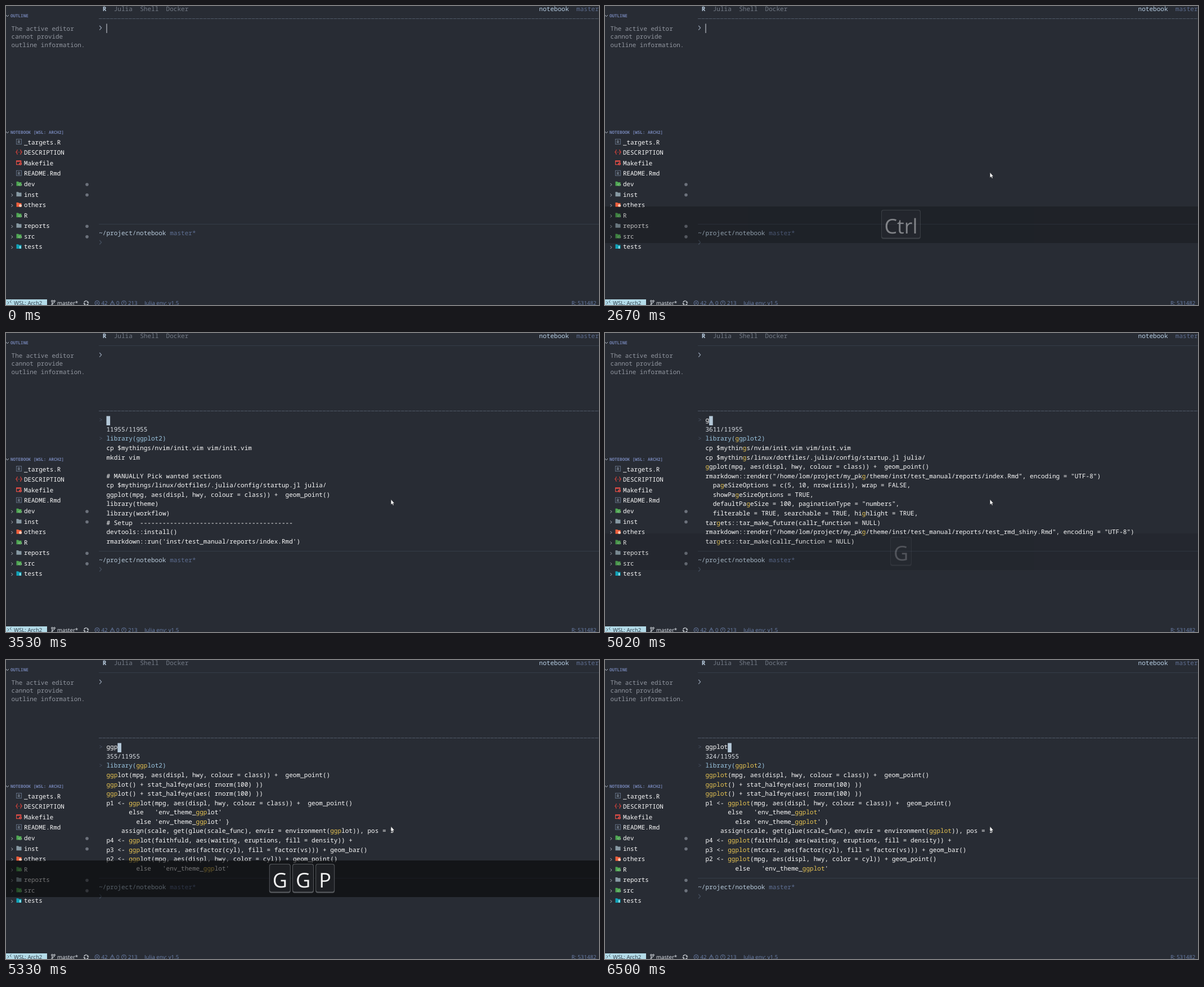
Animation of 1054x531 px, one loop 8 s. Source, as an HTML page:

```html
<!DOCTYPE html>
<html lang="en">
<head>
<meta charset="utf-8">
<title>Terminal history search</title>
<style>
  html, body { margin: 0; width: 100%; height: 100%; overflow: hidden; background: #282c34; }
  svg { display: block; width: 1054px; height: 531px; }
  text { white-space: pre; text-rendering: geometricPrecision; }
  .mono, .side, .head { font-family: "Noto Sans Mono", "DejaVu Sans Mono", monospace; }
  .mono { font-size: 11.05px; font-weight: 500; }
  .side { font-size: 10.9px; font-weight: 500; }
  .head { font-size: 7.55px; font-weight: 700; }
  .bar { font-family: "Open Sans", "Noto Sans", sans-serif; font-size: 9.7px; }
  .key { font-family: "Open Sans", "Noto Sans", sans-serif; font-size: 36px; text-anchor: middle; }
</style>
</head>
<body>
<svg id="stage" viewBox="0 0 1054 531" xml:space="preserve">
  <rect width="1054" height="531" fill="#282c34"/>
  <g id="side"></g>
  <g id="term"></g>
  <g id="idle"></g>
  <g id="search"></g>
  <g id="status"></g>
  <g id="keys"></g>
  <path id="mouse" d="M0 0V9.4L2.2 7.5L3.7 10.6L5.1 9.9L3.7 6.9H6.3Z" fill="#fff" stroke="#15171b" stroke-width=".5"/>
</svg>
<script>
const LOOP = 8000;
const LEFT = 165.2, COL = 6.63, ROW = 16.56;
const $ = id => document.getElementById(id);
const colX = c => LEFT + c * COL;
const rowY = r => 5.7 + r * ROW;

function add(parent, tag, attrs, content) {
  const node = document.createElementNS("http://www.w3.org/2000/svg", tag);
  for (const k in attrs) node.setAttribute(k, attrs[k]);
  if (content !== undefined) node.textContent = content;
  parent.appendChild(node);
  return node;
}
const label = (g, cls, x, y, fill, s, more) =>
  add(g, "text", { class: cls, x, y, fill, ...more }, s);
const cell = (g, col, row, fill, s, more) =>
  label(g, "mono", colX(col), Math.round(rowY(row) + 3.6), fill, s, more);
const stroke = (g, d, color, width = 1) =>
  add(g, "path", { d, fill: "none", stroke: color, "stroke-width": width });
const box = (g, x, y, width, height, fill, rx = 0) =>
  add(g, "rect", { x, y, width, height, fill, rx });
const dot = (g, cx, cy, r, fill) => add(g, "circle", { cx, cy, r, fill });

function rule(g, y, bright) {
  const line = stroke(g, `M165 ${y}H1054`, bright ? "#505968" : "#353c48");
  if (bright) line.setAttribute("stroke-dasharray", "5.63 1");
}
function prompt(g, row, color) {
  const y = rowY(row);
  stroke(g, `M${LEFT + 1} ${y - 3.8}L${LEFT + 4.4} ${y}L${LEFT + 1} ${y + 3.8}`, color, 1.3);
}

// Sidebar
function folder(g, y, color) {
  add(g, "path", { d: `M18.5 ${y - 4.5}h3.4l1.2 1.2h4.4v6.6h-9z`, fill: color });
}
const icons = {
  r(g, y) {
    add(g, "rect", { x: 18.5, y: y - 5.5, width: 9, height: 9, fill: "none", stroke: "#66748a", "stroke-width": .9 });
    label(g, "head", 20.7, y + 1.9, "#a5b4c6", "R", { style: "font-weight:400" });
  },
  braces(g, y) {
    stroke(g, `M20.8 ${y - 5}q-1.4 0-1.4 1.6t-1.3 2.2q1.3.5 1.3 2.2t1.4 1.6M25.2 ${y - 5}q1.4 0 1.4 1.6t1.3 2.2q-1.3.5-1.3 2.2t-1.4 1.6`, "#e5453d", 1.1);
    dot(g, 22, y - 1, .6, "#e5453d");
    dot(g, 24, y - 1, .6, "#e5453d");
  },
  make(g, y) {
    add(g, "rect", { x: 18.6, y: y - 4, width: 8, height: 6.5, fill: "none", stroke: "#ee5048", "stroke-width": 1.1 });
    box(g, 18, y - 4.6, 9.2, 2, "#ee5048");
    dot(g, 25.6, y + 1.2, 2.4, "#ee5048");
    dot(g, 25.6, y + 1.2, .8, "#282c34");
  },
  code(g, y) {
    folder(g, y, "#4fa653");
    stroke(g, `M24.2 ${y - .6}l-1.5 1.8l1.5 1.8M26.4 ${y - .6}l1.5 1.8l-1.5 1.8`, "#b7dcb5", .9);
  },
  plain(g, y) { folder(g, y, "#8799a3"); },
  other(g, y) {
    folder(g, y, "#ee5f3c");
    dot(g, 25.6, y + 1, 2.5, "#f5c9b5");
  },
  test(g, y) {
    folder(g, y, "#12a3b8");
    box(g, 24.1, y - 1.8, 2.2, 5, "#a9e6ee", 1);
  }
};
const files = [
  ["r", "_targets.R"], ["braces", "DESCRIPTION"], ["make", "Makefile"], ["r", "README.Rmd"],
  ["code", "dev", 1], ["plain", "inst", 1], ["other", "others", 0], ["code", "R", 0],
  ["plain", "reports", 1], ["code", "src", 1], ["test", "tests", 0]
];
function drawSide(g) {
  [[17, "OUTLINE"], [224, "NOTEBOOK [WSL: ARCH2]"]].forEach(([y, s]) => {
    stroke(g, `M0 ${y - 1}l2.4 2.8l2.6-2.8`, "#aeb6c2");
    label(g, "head", 8, y + 2.5, "#7484b4", s);
  });
  ["The active editor", "cannot provide", "outline information."].forEach((s, i) =>
    label(g, "side", 9.6, Math.round(44 + i * 14.4), "#9297a0", s));
  files.forEach(([icon, name, changed], i) => {
    const y = 242 + i * 18.57;
    icons[icon](g, y);
    label(g, "side", 32, Math.round(y + 3.7), "#fafafa", name);
    if (changed !== undefined) stroke(g, `M9.5 ${y - 1.4}l2.4 2.4l-2.4 2.4`, "#c3c8d0", .9);
    if (changed) dot(g, 144, y + .7, 2.8, "#6c727c");
  });
}

function drawTerm(g) {
  cell(g, 1, 0, "#b9cde0", "R", { style: "font-weight:700" });
  ["Julia", "Shell", "Docker"].forEach((s, i) => cell(g, 4 + i * 7, 0, "#737a86", s));
  cell(g, 118, 0, "#b9d0e6", "notebook");
  cell(g, 128, 0, "#5e6d8f", "master");
  prompt(g, 2, "#8f9aab");
  rule(g, 387.5, false);
  cell(g, 0, 24, "#b8cbdc", "~/project/notebook");
  cell(g, 19, 24, "#5f7094", "master*");
  prompt(g, 25, "#444e5d");
}

function drawStatus(g) {
  const dim = "#6b80ab", y = 531;
  box(g, 0, 521, 73, 10, "#b3dbe8");
  stroke(g, "M2.5 524.5l2.5 2.5l-2.5 2.5M9.5 522.5l-2.5 2.5l2.5 2.5", "#3b4d5a", .9);
  label(g, "bar", 14, y, "#2c3a46", "WSL: Arch2");
  stroke(g, "M82 525.5v4.5M86 525.5q0 2.5-4 2.8", "#e3e8ee");
  [[82, 524], [86, 524], [82, 531]].forEach(([x, cy]) =>
    add(g, "circle", { cx: x, cy, r: 1.4, fill: "none", stroke: "#e3e8ee", "stroke-width": .9 }));
  label(g, "bar", 91, y, "#e3e8ee", "master*");
  stroke(g, "M138.8 526.8a3.8 3.8 0 0 1 7.2-.8M146.2 528.2a3.8 3.8 0 0 1-7.2.8M144 526.5h3.2M137.6 528.5h3.2", "#e3e8ee", 1.1);
  [162, 209.5].forEach(cx =>
    add(g, "circle", { cx, cy: 527.5, r: 4, fill: "none", stroke: dim, "stroke-width": .9 }));
  stroke(g, "M160.4 525.9l3.2 3.2m0-3.2l-3.2 3.2M189 523.5l4 7.5h-8zM189 526v2.6M209.5 525v3.5", dim, .9);
  label(g, "bar", 169.5, y, dim, "42");
  label(g, "bar", 196, y, dim, "0");
  label(g, "bar", 217, y, dim, "213");
  label(g, "bar", 246, y, dim, "Julia env: v1.5");
  label(g, "bar", 1005, y, dim, "R: 531482");
}

// History lists
const plot = "ggplot(mpg, aes(displ, hwy, colour = class)) +  geom_point()";
const render = file => `rmarkdown::render("/home/lom/project/my_pkg/theme/inst/test_manual/reports/${file}.Rmd", encoding = "UTF-8")`;
const startup = "cp $mythings/linux/dotfiles/.julia/config/startup.jl julia/";
const vimrc = "cp $mythings/nvim/init.vim vim/init.vim";
const halfeye = "ggplot() + stat_halfeye(aes( rnorm(100) ))";
const lists = {
  all: [
    "library(ggplot2)", vimrc, "mkdir vim", "", "# MANUALLY Pick wanted sections", startup, plot,
    "library(theme)", "library(workflow)", "# Setup  " + "-".repeat(41), "devtools::install()",
    "rmarkdown::run('inst/test_manual/reports/index.Rmd')"
  ],
  g: [
    "library(ggplot2)", vimrc, startup, plot, render("index"),
    "  pageSizeOptions = c(5, 10, nrow(iris)), wrap = FALSE,",
    "  showPageSizeOptions = TRUE,",
    '  defaultPageSize = 100, paginationType = "numbers",',
    "  filterable = TRUE, searchable = TRUE, highlight = TRUE,",
    "targets::tar_make_future(callr_function = NULL)", render("test_rmd_shiny"),
    "targets::tar_make(callr_function = NULL)"
  ],
  plot: [
    "library(ggplot2)", plot, halfeye, halfeye, "p1 <- " + plot,
    "      else   'env_theme_ggplot'",
    "        else 'env_theme_ggplot' }",
    "    assign(scale, get(glue(scale_func), envir = environment(ggplot)), pos = 1",
    "p4 <- ggplot(faithfuld, aes(waiting, eruptions, fill = density)) +",
    "p3 <- ggplot(mtcars, aes(factor(cyl), fill = factor(vs))) + geom_bar()",
    "p2 <- ggplot(mpg, aes(displ, hwy, color = cyl)) + geom_point()",
    "        else   'env_theme_ggplot'"
  ]
};

function drawIdle(g, caret) {
  g.replaceChildren();
  rule(g, 22.5, true);
  if (caret) box(g, 178.5, 31.5, 1, 16.5, "#d5dae2");
}

function drawSearch(g, [, query, count, list]) {
  g.replaceChildren();
  rule(g, 22.5, false);
  rule(g, 138.5, true);
  cell(g, 0, 9, "#465060", ">");
  cell(g, 2, 9, "#fafafa", query);
  box(g, colX(2 + query.length), 147.5, COL, 16.5, "#b4c8d8");
  cell(g, 2, 10, "#dde2e8", count + "/11955");
  cell(g, 0, 11, "#465060", ">");
  lists[list].forEach((line, i) => {
    const at = query ? line.toLowerCase().indexOf(query) : -1;
    const end = at + query.length;
    const t = cell(g, 2, 11 + i, i ? "#fafafa" : "#9cc7e2");
    if (at < 0) { t.textContent = line; return; }
    add(t, "tspan", {}, line.slice(0, at));
    add(t, "tspan", { fill: "#e6c352" }, line.slice(at, end));
    add(t, "tspan", {}, line.slice(end));
  });
}

// Key overlay
const keyWidth = { Ctrl: 70, R: 35, G: 38, P: 34, L: 30, O: 40, T: 32 };
function drawKeys(g, [, names, opacity]) {
  g.replaceChildren();
  if (!names) return;
  g.setAttribute("opacity", opacity);
  box(g, 0, 356, 1054, 65, "rgba(0,0,0,.53)");
  const keys = names.split(" "), gap = 3.2;
  let x = 526 - (keys.reduce((w, k) => w + keyWidth[k], 0) + gap * (keys.length - 1)) / 2;
  for (const k of keys) {
    const w = keyWidth[k];
    box(g, x, 362, w, 51.8, "#56595d", 4);
    box(g, x + 1, 363, w - 2, 48.4, "#1e2024", 3.5);
    label(g, "key", x + w / 2, 403.5, "#f4f4f4", k);
    x += w + gap;
  }
}

// Tables of steps, each starting with its time in ms
const idleSteps = [[0, true], [1040, false], [1190, true]];
const searchSteps = [
  [0], [2900, "", 11955, "all"], [5020, "g", 3611, "g"], [5250, "gg", 402, "plot"],
  [5330, "ggp", 355, "plot"], [5410, "ggpl", 324, "plot"],
  [5560, "ggplo", 324, "plot"], [5640, "ggplot", 324, "plot"]
];
const keySteps = [
  [0], [2670, "Ctrl", .43], [2750, "Ctrl", .85], [2820, "Ctrl R", 1], [3530],
  [5020, "G", .2], [5100, "G", .6], [5180, "G G", 1], [5330, "G G P", 1], [5410, "G G P L", 1],
  [5560, "G G P L O", 1], [5640, "G G P L O T", 1], [6500]
];
const mouseSteps = [
  [0], [70, 745.5, 363], [140, 695, 332], [205, 595, 270], [275, 480, 200], [340, 386, 142],
  [410, 351, 121], [1500, 385, 139], [1580, 490, 194], [1660, 612, 258], [1740, 684.2, 295.6]
];

const tracks = [
  [idleSteps, s => drawIdle($("idle"), s[1])],
  [searchSteps, s => {
    const open = s.length > 1;
    $("idle").style.display = open ? "none" : "";
    $("search").style.display = open ? "" : "none";
    if (open) drawSearch($("search"), s);
  }],
  [keySteps, s => drawKeys($("keys"), s)],
  [mouseSteps, s => {
    $("mouse").style.display = s.length > 1 ? "" : "none";
    $("mouse").setAttribute("transform", `translate(${s[1] || 0} ${s[2] || 0})`);
  }]
].map(([steps, draw]) => ({ steps, draw, now: null }));

drawSide($("side"));
drawTerm($("term"));
drawStatus($("status"));

const start = performance.now();
function tick() {
  const t = (performance.now() - start) % LOOP;
  for (const track of tracks) {
    const step = track.steps.findLast(s => s[0] <= t);
    if (step !== track.now) track.draw(track.now = step);
  }
  requestAnimationFrame(tick);
}
tick();
</script>
</body>
</html>
```
